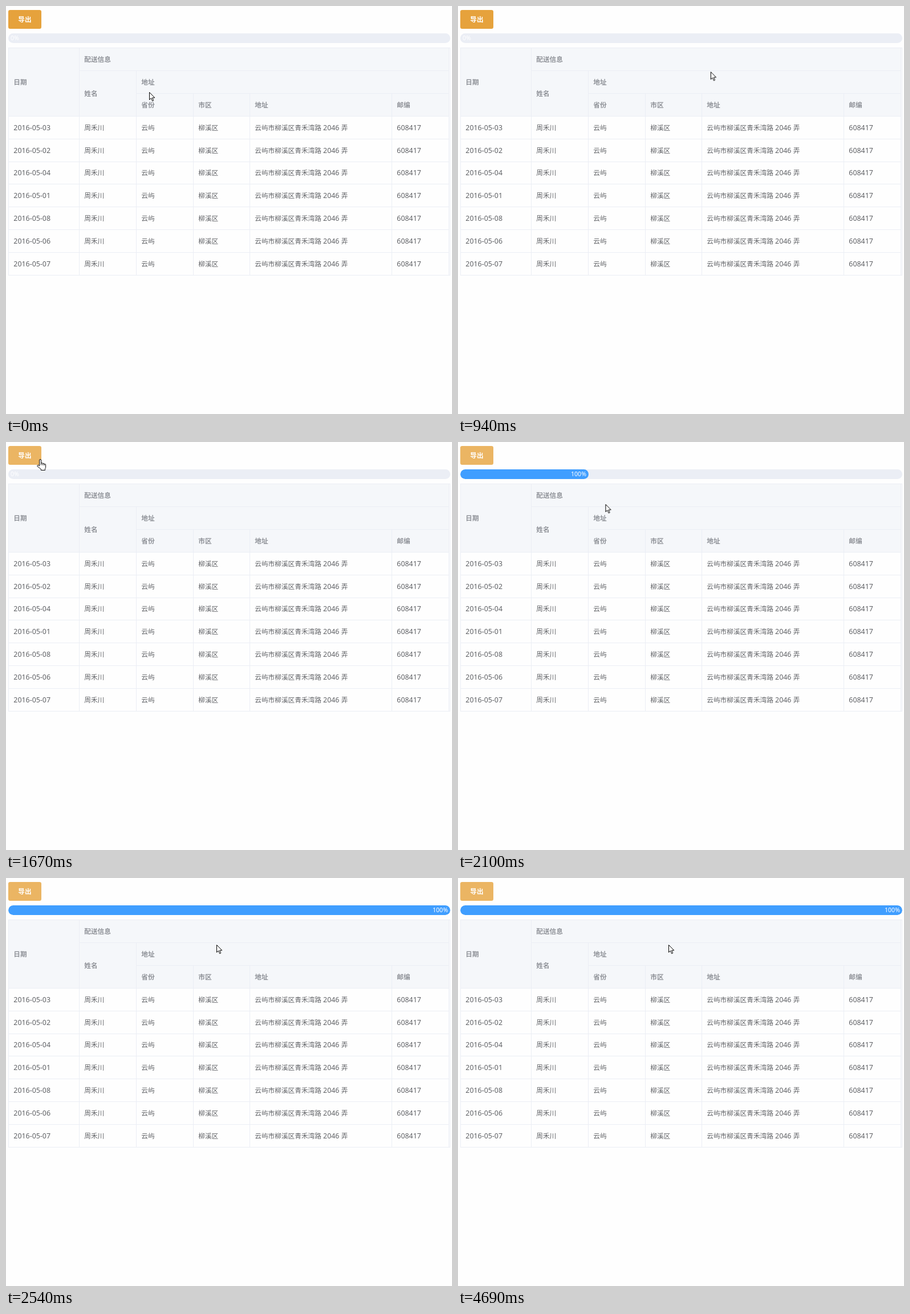
An HTML page for the animation above (8000 ms loop, 782 by 716 pixels).

```html
<!DOCTYPE html>
<html lang="zh-CN">
<head>
<meta charset="utf-8">
<title>导出</title>
<style>
  html, body { margin: 0; width: 100%; height: 100%; overflow: hidden; background: #fefefe; }
  body {
    position: relative;
    font-family: "Noto Sans", "Noto Sans CJK SC", "Noto Sans CJK", sans-serif;
    font-size: 11.67px;
  }
  svg { position: absolute; left: 0; top: 0; overflow: visible; }
  .loop, .loop * { animation-duration: 8s; animation-iteration-count: infinite; animation-timing-function: linear; }

  .button {
    position: absolute; left: 4px; top: 7px; width: 58px; height: 33px;
    border-radius: 3.3px; background: #e6a23c; color: #fff;
    font-weight: 700; line-height: 33px; text-align: center;
    animation-name: hover;
  }
  @keyframes hover {
    0%, 14.94% { background: #e6a23c; }
    16.19%, 100% { background: #ebb563; }
  }

  .track {
    position: absolute; left: 4px; top: 48px; width: 775px; height: 17px;
    border-radius: 9px; background: #ebeef5; overflow: hidden;
    color: #fff; font-size: 10.6px; line-height: 17px; white-space: nowrap;
  }
  .fill {
    height: 100%; border-radius: 9px; background: #409eff; text-align: right;
    animation-name: fill;
  }
  .track span { display: inline-block; margin: 0 4px; }
  .track .zero { position: absolute; left: 0; top: 0; animation-name: zero; }
  .done { animation-name: done; }
  @keyframes fill {
    0% { width: 0; }
    24.95% { width: 0; animation-timing-function: ease; }
    31.575%, 100% { width: 100%; }
  }
  @keyframes zero {
    0% { opacity: 1; animation-timing-function: step-end; }
    24.95%, 100% { opacity: 0; }
  }
  @keyframes done {
    0% { opacity: 0; animation-timing-function: step-end; }
    24.95%, 100% { opacity: 1; }
  }

  .head { font-weight: 700; fill: #909399; }
  .cell { fill: #606266; }
  .num { font-size: 12.4px; }
  .line { fill: #ebeef5; }

  .cursor { animation-name: travel; }
  .cursor path { fill: #fff; stroke: #000; stroke-linejoin: round; }
  .arrow { animation-name: arrow; }
  .hand { animation-name: hand; }
  @keyframes travel {
    0%, .25% { transform: translate(251px, 151px); }
    2.5% { transform: translate(380px, 148px); }
    4.75% { transform: translate(590px, 164px); }
    6% { transform: translate(660px, 175px); }
    6.625% { transform: translate(672px, 172px); }
    7.375% { transform: translate(676px, 167px); }
    9% { transform: translate(676px, 167px); animation-timing-function: ease-in-out; }
    15.5% { transform: translate(50px, 28px); }
    19.375% { transform: translate(50px, 26px); animation-timing-function: cubic-bezier(.33, 0, .67, .33); }
    26.25% { transform: translate(258px, 109px); }
    29.125% { transform: translate(356px, 114px); animation-timing-function: ease-out; }
    31.75%, 100% { transform: translate(369px, 117px); }
  }
  @keyframes arrow {
    0% { opacity: 1; animation-timing-function: step-end; }
    14.94% { opacity: 0; animation-timing-function: step-end; }
    21%, 100% { opacity: 1; }
  }
  @keyframes hand {
    0% { opacity: 0; animation-timing-function: step-end; }
    14.94% { opacity: 1; animation-timing-function: step-end; }
    21%, 100% { opacity: 0; }
  }

  .download { fill: #4285f4; opacity: 0; animation-name: slide, flash; }
  @keyframes slide {
    0%, 45.5% { transform: none; }
    49.625%, 100% { transform: translateY(40px); }
  }
  @keyframes flash {
    0% { opacity: 0; animation-timing-function: step-end; }
    45.5% { opacity: .36; animation-timing-function: cubic-bezier(.33, .67, .67, 1); }
    47.34% { opacity: 1; animation-timing-function: cubic-bezier(.33, 0, .67, .33); }
    49.625%, 100% { opacity: 0; }
  }
</style>
</head>
<body class="loop">
<div class="button">导出</div>
<div class="track">
  <div class="fill"><span class="done">100%</span></div>
  <span class="zero">0%</span>
</div>

<svg width="782" height="716">
  <g id="table"></g>
  <g class="download">
    <path d="M24 683h7v7h4.500l-8 9-8-9h4.500z"/>
    <rect x="15" y="710" width="25.500" height="3"/>
  </g>
  <g class="cursor">
    <path class="arrow" d="M.5.5v13l3-2.800 2.200 5 2-.9-2.100-4.800h4.200z"/>
    <g class="hand">
      <path transform="translate(-6 0)" d="M4.500 12V2q0-1.500 1.500-1.500T7.500 2v5q3-.8 3 .7 2.700-.6 2.700.9 2.300-.3 2.300 1.500v4q0 1.500-1.200 3.200v2.200h-7v-2L1 12.800Q.2 11 2 10.500q1.200 0 2.500 1.500zM7.500 7v3.500M10.500 7.700v3M13.200 8.600v2.500"/>
    </g>
  </g>
</svg>

<script>
  const table = document.getElementById("table");
  const cols = [4, 128, 228, 328, 427, 676, 776];
  const rowY = i => Math.round(73 + 39.9 * i);

  function add(tag, attrs, text) {
    const el = document.createElementNS("http://www.w3.org/2000/svg", tag);
    for (const key in attrs) el.setAttribute(key, attrs[key]);
    if (text) el.textContent = text;
    table.append(el);
    return el;
  }
  const rect = (x, y, width, height, extra) =>
    add("rect", { x, y, width, height, class: "line", ...extra });
  const hLine = (col, row, end = 777) => rect(cols[col], rowY(row), end - cols[col], 1);
  const vLine = (x, row) => rect(x, rowY(row), 1, rowY(10) - rowY(row));
  // row may be fractional for cells that span several rows
  const label = (text, col, row, cls) =>
    add("text", { x: cols[col] + 9.3, y: 97.9 + 39.9 * row, class: cls }, text);

  rect(4, 73, 773, 120, { style: "fill:#f5f7fa" });
  hLine(0, 0, 779);
  hLine(1, 1);
  hLine(2, 2);
  for (let i = 3; i <= 10; i++) hLine(0, i, i < 10 ? 777 : 779);
  [0, 0, 1, 2, 2, 2, 0].forEach((row, i) => vLine(cols[i], i === 2 ? 1 : i === 1 ? 0 : row));
  vLine(778, 0);

  label("日期", 0, 1, "head");
  label("配送信息", 1, 0, "head");
  label("姓名", 1, 1.5, "head");
  label("地址", 2, 1, "head");
  ["省份", "市区", "地址", "邮编"].forEach((text, i) => label(text, i + 2, 2, "head"));

  [3, 2, 4, 1, 8, 6, 7].forEach((day, i) => {
    const row = i + 3;
    label("2016-05-0" + day, 0, row, "cell num");
    label("周禾川", 1, row, "cell");
    label("云屿", 2, row, "cell");
    label("柳溪区", 3, row, "cell");
    label("", 4, row, "cell").innerHTML =
      '云屿市柳溪区青禾湾路<tspan class="num"> 2046 </tspan>弄';
    label("608417", 5, row, "cell num");
  });
</script>
</body>
</html>
```
